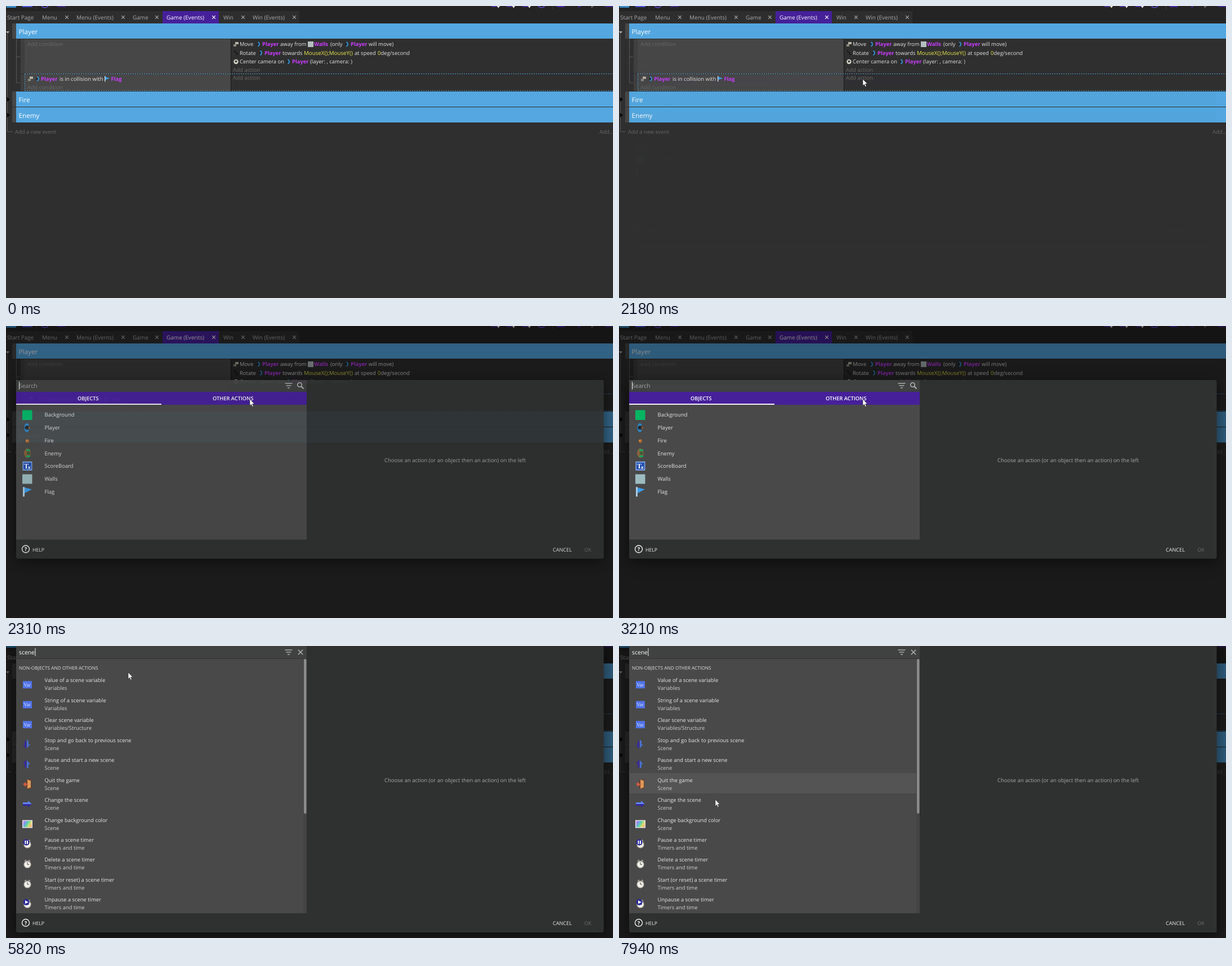
These frames come from a looping animation (1078 px wide and 519 px high, 7990 ms). An HTML page with a canvas:

```html
<!DOCTYPE html>
<html lang="en">
<head>
<meta charset="utf-8">
<title>Event editor</title>
<style>
html, body { margin: 0; width: 100%; height: 100%; overflow: hidden; background: #2f2f2f; }
canvas { display: block; }
</style>
</head>
<body>
<canvas id="stage"></canvas>
<script>
const W = 1078, H = 519, LOOP = 7990, ROW = 35.45;
const BLUE = '#54a7e1', VIOLET = '#46209a', PINK = '#cb3dff', YELLOW = '#e9e94e', DIM = '#686868', WHITE = '#fff';

const layer = el => {
  el.width = W;
  el.height = H;
  const ctx = el.getContext('2d');
  ctx.textRendering = 'geometricPrecision';
  return ctx;
};
const stage = layer(document.getElementById('stage'));
const editor = layer(document.createElement('canvas'));
const dialog = layer(document.createElement('canvas'));
let g = editor;

// y is the middle of the capitals
function text(s, x, y, color = '#e2e2e2', size = 9.5, weight = 400) {
  g.font = `${weight} ${size}px "Open Sans", "Noto Sans", sans-serif`;
  g.fillStyle = color;
  g.fillText(s, x, y + size * 0.36);
}
function box(x, y, w, h, color) {
  g.fillStyle = color;
  g.fillRect(x, y, w, h);
}
function disc(x, y, rx, color, ry = rx) {
  g.fillStyle = color;
  g.beginPath();
  g.ellipse(x, y, rx, ry, 0, 0, 7);
  g.fill();
}
function poly(points, color, x = 0, y = 0) {
  g.fillStyle = color;
  g.beginPath();
  for (let i = 0; i < points.length; i += 2) g.lineTo(x + points[i], y + points[i + 1]);
  g.closePath();
  g.fill();
}
function line(x1, y1, x2, y2, color, width = 1) {
  g.strokeStyle = color;
  g.lineWidth = width;
  g.beginPath();
  g.moveTo(x1, y1);
  g.lineTo(x2, y2);
  g.stroke();
}
function ring(x, y, r, color, width = 1) {
  g.strokeStyle = color;
  g.lineWidth = width;
  g.beginPath();
  g.arc(x, y, r, 0, 7);
  g.stroke();
}
function cross(x, y, r, color, width) {
  line(x - r, y - r, x + r, y + r, color, width);
  line(x - r, y + r, x + r, y - r, color, width);
}

// Object and action icons, centred on x, y
const flag = (x, y, k = 1) => {
  poly([-8, -8, 8, -4, -5, 3], '#3d9be6', x, y);
  box(x - 8 * k, y - 8 * k, 3 * k, 17 * k, '#a9cbe0');
};
const smallFlag = (x, y) => {
  poly([-3, -4, 5, -1, -3, 2], '#3d9be6', x, y);
  box(x - 4, y - 5, 1.5, 10, '#c3d7e2');
};
const ship = (x, y, k = 1) => {
  disc(x - k, y, 4.5 * k, '#2f86c4', 8 * k);
  disc(x, y, 4.5 * k, '#26292e', 3.6 * k);
  disc(x + 2.5 * k, y, 2.2 * k, '#a36d3a');
  disc(x + 1.2 * k, y, 1.6 * k, '#26292e');
};
const smallShip = (x, y) => {
  g.strokeStyle = '#348dcb';
  g.lineWidth = 2.2;
  g.beginPath();
  g.arc(x - 2, y, 4, -1.2, 1.2);
  g.stroke();
  disc(x - 1, y, 1.6, '#17222b');
};
const varIcon = (x, y) => {
  box(x - 8, y - 6, 16, 13, '#5273e8');
  g.font = '9px "Liberation Serif", serif';
  g.fillStyle = '#dbe4ff';
  g.fillText('Var', x - 6.8, y + 3.6);
};
const clock = (x, y) => {
  line(x - 5, y - 5, x - 2, y - 7, '#999', 2);
  line(x + 5, y - 5, x + 2, y - 7, '#999', 2);
  disc(x, y + 1, 6.6, '#b9b5ac');
  disc(x, y + 1, 5.2, '#f3f1ec');
  line(x, y + 1, x, y - 3, '#444');
  line(x, y + 1, x + 3, y + 1, '#444');
};
const badge = (x, y) => {
  clock(x, y);
  disc(x - 2, y - 3, 5.5, '#2a2a98');
};
const pauseTimer = (x, y) => {
  badge(x, y);
  box(x - 4.5, y - 6, 2, 6, WHITE);
  box(x - 1, y - 6, 2, 6, WHITE);
};
const playTimer = (x, y) => {
  badge(x, y);
  poly([-4, -6, 2, -3, -4, 0], WHITE, x, y);
};
const twoArrows = (x, y, s) => {
  poly([-7, s, -4, s, -4, -6 * s, -1, -6 * s, -1, 8 * s], '#392a9c', x, y);
  poly([0, -8 * s, 0, 7 * s, 6, 0, 3, 0, 3, -6 * s], '#496fd0', x, y);
};
const downArrows = (x, y) => twoArrows(x - 1, y, 1);
const upArrows = (x, y) => twoArrows(x - 1, y, -1);
const door = (x, y) => {
  box(x - 2, y - 8, 9, 16, '#6d3b22');
  poly([0, -8, 6, -6, 6, 6, 0, 8], '#dc9a5c', x, y);
  poly([-8, 0, -3, -4, -3, -1, 1, -1, 1, 2, -3, 2, -3, 5], '#cf5a41', x, y);
};
const rightArrow = (x, y) => {
  poly([-8, -3, 1, -3, 1, -6, 8, 0, -8, 0], '#5f84ee', x, y);
  poly([-8, 0, 8, 0, 1, 6, 1, 3, -8, 3], '#34289b', x, y);
};
const palette = (x, y) => {
  box(x - 9, y - 7, 18, 14, '#e4e4e4');
  const hue = g.createLinearGradient(x - 8, y - 5, x + 8, y + 5);
  ['#e86fd4', '#799bf2', '#63d99e', '#eedb6a', '#e88468'].forEach((c, i) => hue.addColorStop(i / 4, c));
  box(x - 7.5, y - 5.5, 15, 11, hue);
};

const objects = [
  ['Background', (x, y) => box(x - 9, y - 8.5, 17.5, 17.5, '#05b562')],
  ['Player', ship],
  ['Fire', (x, y) => { disc(x, y + 1, 3.2, '#a4622f'); disc(x - 1, y, 1.5, '#d48b45'); }],
  ['Enemy', (x, y) => {
    disc(x, y, 6, '#86623c', 8.5);
    box(x - 2, y - 7, 7, 3, '#14a25f');
    box(x - 2, y + 4, 7, 3, '#14a25f');
    disc(x + 2, y, 3, '#3d5a38');
  }],
  ['ScoreBoard', (x, y) => {
    box(x - 8.5, y - 8, 17, 16, '#7ea6e6');
    box(x - 7, y - 6, 14, 12, '#2450b0');
    g.font = 'bold 12px "Liberation Serif", serif';
    g.fillStyle = WHITE;
    g.fillText('T', x - 6, y + 4);
    text('x', x + 1, y + 2, WHITE, 8, 700);
  }],
  ['Walls', (x, y) => box(x - 9, y - 8, 17.5, 17, '#9dbcc0')],
  ['Flag', flag]
];

const actions = [
  ['Value of a scene variable', 'Variables', varIcon],
  ['String of a scene variable', 'Variables', varIcon],
  ['Clear scene variable', 'Variables/Structure', varIcon],
  ['Stop and go back to previous scene', 'Scene', downArrows, true],
  ['Pause and start a new scene', 'Scene', upArrows, true],
  ['Quit the game', 'Scene', door, true],
  ['Change the scene', 'Scene', rightArrow],
  ['Change background color', 'Scene', palette, true],
  ['Pause a scene timer', 'Timers and time', pauseTimer],
  ['Delete a scene timer', 'Timers and time', clock],
  ['Start (or reset) a scene timer', 'Timers and time', clock],
  ['Unpause a scene timer', 'Timers and time', playTimer]
];

function drawToolbar() {
  box(0, 0, W, 31, '#242424');
  box(1, 0, 17, 3, '#3b8ac4');
  box(29, 0, 18, 2, '#4a55d8');
  box(53, 0, 1, 6, '#3a3a3a');
  ring(69, -4, 7, '#5a4bd0', 1.5);
  box(91, 0, 15, 1.5, '#4a2aa8');
  for (const x of [862, 889, 917]) {
    box(x, 0, 10, 1.5, '#5436b4');
    box(x + 10, 0, 5, 1, WHITE);
    box(x + 11.5, 0, 2, 3, WHITE);
  }
  ring(951, -4, 7, '#5a4bd0', 1.5);
  box(971, 0, 1, 6, '#3a3a3a');
  box(978, 0, 14, 2, '#4a2aa8');
  box(1016, 0, 4, 2, '#4a2aa8');
  poly([1039, 0, 1044, 0, 1040, 4], '#666');
  box(1064, 0, 14, 1.5, '#4a2aa8');
}

function drawTabs() {
  box(0, 9, 521, 22, '#2e2e2e');
  box(278, 9, 100, 22, VIOLET);
  [['Start Page', 2], ['Menu', 64, 108], ['Menu (Events)', 125, 208], ['Game', 225, 268],
   ['Game (Events)', 285, 369], ['Win', 386, 421], ['Win (Events)', 438, 512]].forEach(([s, x, close], i) => {
    const color = i === 4 ? WHITE : '#a9a9a9';
    text(s, x, 20.5, color, 10);
    if (close) cross(close, 20, 2.8, color, 1.2);
  });
}

function drawGroup(title, y) {
  box(11, y, 7, 27, '#474747');
  box(18, y, W - 18, 27, BLUE);
  text(title, 22.5, y + 14.5, WHITE, 11.7, 500);
}

function drawEditor() {
  g = editor;
  box(0, 0, W, H, '#2f2f2f');
  drawToolbar();
  drawTabs();

  const tree = '#585858';
  line(2.5, 50, 2.5, 223, tree);
  line(2.5, 223.5, 11, 223.5, tree);
  line(18.5, 59, 18.5, 136, tree);
  line(18.5, 90.5, 25, 90.5, tree);
  line(18.5, 136.5, 25, 136.5, tree);

  drawGroup('Player', 31);
  drawGroup('Fire', 152);
  drawGroup('Enemy', 180);
  poly([0, 45, 6, 45, 3, 49], '#b0b0b0');
  for (const y of [166, 194]) poly([2, y - 4, 7, y, 2, y + 4], '#080808');

  box(11, 59, 1, 92, '#292929');
  for (const [y, h] of [[59, 61], [121, 30]]) {
    box(26, y, 7, h, '#3f3f3f');
    box(33, y, 366, h, '#474747');
    box(399, y, 1, h, '#181818');
  }
  g.setLineDash([2, 2]);
  line(33, 120.5, W, 120.5, '#4f9dcc');
  line(33, 150.5, W, 150.5, '#4f9dcc');
  line(33.5, 121, 33.5, 150, '#4f9dcc');
  g.setLineDash([]);

  text('Add condition', 38, 68, DIM, 9.7);
  text('Add condition', 38, 144.5, DIM, 9.7);
  text('Add action', 403, 114, DIM, 9.7);
  text('Add action', 403, 128, DIM, 9.7);
  text('Add a new event', 16, 223.5, DIM);
  text('Add...', 1054, 223.5, DIM);

  const name = (s, x, y) => text(s, x, y, PINK, 9.4, 700);
  const player = (x, y) => {
    smallShip(x - 7, y);
    name('Player', x, y);
  };
  const push = (x, y) => {
    box(x - 1, y - 4, 6, 4, '#b9b5a6');
    box(x - 4, y, 5, 4, '#8d8a80');
  };

  push(408, 68);
  text('Move', 415, 68);
  player(455, 68);
  text('away from', 487, 68);
  box(536, 63, 10, 10, '#b5bfc0');
  name('Walls', 547, 68);
  text('(only', 576, 68);
  player(612, 68);
  text('will move)', 644, 68);

  line(405, 79, 412, 87, '#151515', 1.5);
  text('Rotate', 415, 83.5);
  player(459, 83.5);
  text('towards', 491, 83.5);
  text('MouseX();MouseY()', 529, 83.5, YELLOW, 9.75);
  text('at speed', 619, 83.5);
  text('0', 660, 83.5, YELLOW);
  text('deg/second', 665.5, 83.5);

  disc(408.5, 99, 4.2, '#d8d8cc');
  disc(408.5, 98.5, 2, '#3d3d3d');
  text('Center camera on', 415, 99);
  player(508, 99);
  text('(layer: , camera: )', 540, 99);

  push(43, 129.5);
  smallShip(56, 129.5);
  name('Player', 62, 129.5);
  text('is in collision with', 95, 129.5);
  smallFlag(179, 129.5);
  name('Flag', 186.5, 129.5);
}

function drawObjects() {
  box(18, 117, 516, 23, VIOLET);
  box(18, 138, 258, 2, '#f2eefc');
  text('OBJECTS', 127, 129, WHITE, 9.3, 600);
  text('OTHER ACTIONS', 367, 129, WHITE, 9.3, 600);
  objects.forEach(([name, icon], i) => {
    const y = 158 + i * 22.7;
    icon(38, y);
    text(name, 68.5, y);
  });
}

function drawActions(t) {
  line(18, 22.5, 534, 22.5, '#333');
  text('NON-OBJECTS AND OTHER ACTIONS', 23, 38.5, '#dedede', 8.35);
  if (t >= 7690) box(18, 226, 511, 36, `rgba(255,255,255,${Math.min(1, (t - 7640) / 150) * 0.06})`);
  actions.forEach(([name, group, icon, late], i) => {
    const y = 61 + i * ROW;
    text(name, 68.5, y, '#e6e6e6', 9.4);
    text(group, 68.5, y + 14, '#cfcfcf', 9.4);
    if (!late || t >= 4150) icon(38, y + 7.3);
  });
  box(528, 23, 6, 452, '#444');
  g.fillStyle = '#8b8b8b';
  g.beginPath();
  g.roundRect(529, 23, 4.5, 275, 2);
  g.fill();
}

function drawDialog(t) {
  g = dialog;
  g.clearRect(0, 0, W, H);
  const tall = t >= 4100, top = tall ? 0 : 96, foot = tall ? 492.5 : 397;
  g.shadowColor = 'rgba(0,0,0,.5)';
  g.shadowBlur = 24;
  g.shadowOffsetY = 6;
  g.fillStyle = '#2f3130';
  g.beginPath();
  g.roundRect(18, tall ? -5 : 96, 1043.5, foot + 16.5 - (tall ? -5 : 96), 3);
  g.fill();
  g.shadowColor = 'transparent';

  const bar = tall ? 11 : 106, listEnd = foot - 17.5;
  box(18, top, 516, listEnd - top, '#494949');
  box(18, top, 516, bar + 11 - top, '#404141');
  if (tall) drawActions(t); else drawObjects();

  const query = !tall ? '' : t < 4180 ? 'sce' : t < 4280 ? 'scen' : 'scene';
  text(query || 'Search', 23, bar + 0.5, query ? WHITE : '#a2a2a2', 10.4);
  const blinks = [[2660, 3210], [4610, 4800], [5340, 5820], [6350, 6880]];
  if (!blinks.some(([a, b]) => t >= a && t < b)) {
    const x = query ? 23.5 + g.measureText(query).width : 23;
    box(x, bar - 7, 1, 14, '#f0f0f0');
  }

  const gray = '#b4b4b4';
  [6.5, 4.5, 2].forEach((r, i) => line(502 - r, bar - 4 + i * 4, 502 + r, bar - 4 + i * 4, gray, 1.4));
  if (t >= 4320) cross(523, bar, 4.2, gray, 1.5);
  else {
    ring(521.5, bar - 1.5, 3.8, gray, 1.6);
    line(524.5, bar + 1.5, 528.5, bar + 5.5, gray, 2);
  }

  text('Choose an action (or an object then an action) on the left', 672, 238.5, '#a6a8a7');
  ring(35, foot - 0.5, 6.5, '#f0f0f0', 1.4);
  text('?', 32.8, foot - 0.3, WHITE, 9.5, 700);
  text('HELP', 47, foot + 0.5, '#ececec', 8.7);
  text('CANCEL', 971, foot + 0.5, '#ececec', 9.1);
  text('OK', 1027, foot + 0.5, '#6c6e6d', 9.1);
}

// Pointer stops: time, x, y
const stops = [
  [440, 846, 499], [700, 640, 300], [950, 500, 155], [1100, 452, 118], [1200, 449, 131], [1350, 444, 135],
  [1600, 444, 135], [1930, 433, 130], [4610, 433, 130], [4810, 433, 96], [4990, 433, 96], [5190, 370, 90],
  [5340, 370, 90], [5590, 218, 49], [5770, 218, 49], [5820, 217, 47], [6090, 217, 47], [6720, 214, 78],
  [6870, 214, 78], [7640, 172, 242], [7690, 172, 243], [7940, 171, 273], [LOOP, 171, 273]
];

function drawPointer(t) {
  if (t < 440) return;
  const i = stops.findIndex(s => s[0] > t);
  const [t0, x0, y0] = stops[i - 1], [t1, x1, y1] = stops[i];
  const p = (t - t0) / (t1 - t0);
  poly([0, 0, 0, 11.5, 2.6, 9.2, 4.4, 13.4, 6.3, 12.6, 4.5, 8.5, 8, 8.3], WHITE, x0 + (x1 - x0) * p, y0 + (y1 - y0) * p);
  g.strokeStyle = '#222';
  g.lineWidth = 0.6;
  g.stroke();
}

function frame(now) {
  const t = now % LOOP;
  const fade = 1 - (1 - Math.min(1, Math.max(0, (t - 2180) / 250))) ** 3.3;
  if (fade) drawDialog(t);
  g = stage;
  g.drawImage(editor.canvas, 0, 0);
  if (fade) {
    box(0, 0, W, H, `rgba(0,0,0,${fade * 0.46})`);
    g.globalAlpha = fade;
    g.drawImage(dialog.canvas, 0, 0);
    g.globalAlpha = 1;
  }
  drawPointer(t);
  requestAnimationFrame(frame);
}

drawEditor();
requestAnimationFrame(frame);
</script>
</body>
</html>
```
